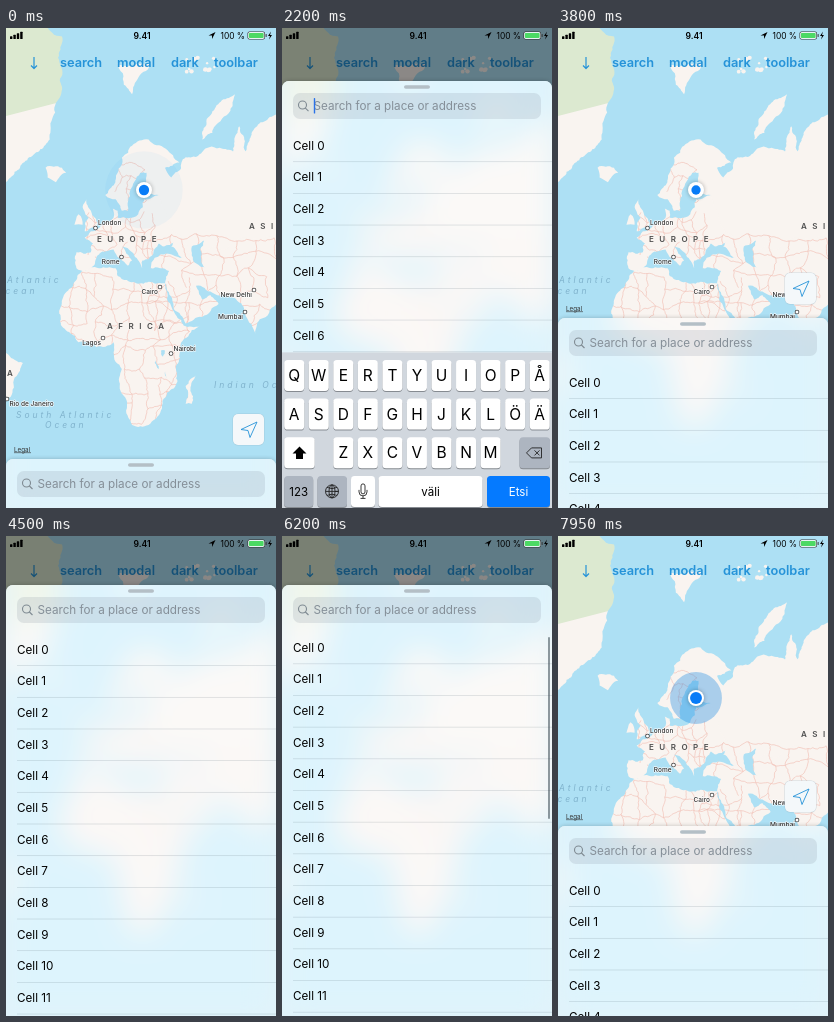
Animation of 270x480 px, one loop 8000 ms. Source, as an HTML page with a canvas:

```html
<!DOCTYPE html>
<html lang="en">
<head>
<meta charset="utf-8">
<title>Map with search sheet</title>
<style>
  html, body { margin: 0; width: 100%; height: 100%; overflow: hidden; background: #ade0f4; }
  canvas { display: block; width: 270px; height: 480px; }
</style>
</head>
<body>
<canvas id="stage"></canvas>
<script>
const W = 270, H = 480, LOOP = 8000;
const DPR = window.devicePixelRatio || 1;
const WATER = '#ade0f4', LAND = '#f9f4f0', BLUE = '#087cf7', TINT = '#2693d8';
const SANS = 'Inter, Roboto, sans-serif';

// Key "longitude,latitude" points; the coast between them is roughened
const GREENLAND = '-50,84 -16,82 -19,76 -22,71 -32,68 -41,64 -50,60';
const COASTS = [
  GREENLAND,
  '-24,66 -16,66 -14,65 -19,63 -23,64',
  '11,80 27,80 18,77 14,78',
  '52,71 57,75 68,77 57,72',
  '-5,50 1,51 -2,56 -4,59 -6,57 -3,54',
  '-6,52 -10,52 -8,55',
  '-9,37 -9,43 -2,43 -1,46 -5,48 2,51 9,54 8,57 11,56 11,54 21,55 24,59 31,60 50,60 52,38 42,41 37,45 39,47 33,45 31,46 28,42 23,40 23,37 19,42 13,45 18,40 16,38 9,44 3,43 0,39 -5,36',
  '31,60 22,60 25,65 22,65 17,61 16,56 13,56 10,59 5,60 11,65 18,70 26,71 41,67 34,66 37,64 44,68 67,69 70,73 73,68 76,72 95,77 95,30 60,36 50,38 35,54',
  '95,46 95,22 88,22 80,15 78,8 73,17 72,21 67,25 57,27 49,30 52,24 56,26 60,22 52,16 44,13 35,28 34,31 36,36 27,37 29,41 42,41 52,44',
  '-6,36 10,37 11,34 20,31 34,31 34,28 33,30 37,21 43,12 51,12 41,-2 40,-15 35,-20 32,-28 26,-34 18,-34 12,-17 13,-9 9,-1 9,4 -8,4 -17,14 -13,28',
  '49,-12 47,-25 44,-25 44,-17',
  '-50,0 -35,-6 -39,-13 -41,-22 -50,-26',
];
const LAKES = ['47,45 53,47 51,44 54,37 49,39', '32,0 34,0 33,-3', '29,-4 31,-9 29,-6', '34,-10 35,-14 34,-12'];
// left, top, columns, rows, spacing of the border mesh
const BORDER_MESHES = [[80, 182, 8, 6, 9.5], [112, 138, 3, 4, 12], [145, 212, 8, 6, 17], [50, 250, 10, 11, 14.5]];
// name, dot x, dot y, label on the right, label below
const CITIES = [
  ['London', 89.5, 200, true, false], ['Rome', 115.5, 229, false, true], ['Cairo', 154, 259, false, true],
  ['Lagos', 97, 310, false, true], ['Nairobi', 165, 325.5, true, false], ['New Delhi', 248, 262, false, true],
  ['Mumbai', 239, 284, false, true], ['Rio de Janeiro', 1, 371, true, true],
];

let seed = 7;
const random = () => (seed = seed * 16807 % 2147483647) / 2147483647;

function makeLayer(canvas) {
  canvas.width = W * DPR;
  canvas.height = H * DPR;
  const c = canvas.getContext('2d');
  c.scale(DPR, DPR);
  return c;
}
const newLayer = () => makeLayer(document.createElement('canvas'));

function text(c, str, x, y, size, color, { weight = 400, align = 'left', style = 'normal', spacing = 0, halo } = {}) {
  c.font = `${style} ${weight} ${size}px ${SANS}`;
  c.textAlign = align;
  c.letterSpacing = spacing + 'px';
  if (halo) {
    c.strokeStyle = halo;
    c.lineWidth = 1.4;
    c.lineJoin = 'round';
    c.strokeText(str, x, y);
  }
  c.fillStyle = color;
  c.fillText(str, x, y);
}
function box(c, x, y, w, h, r, color) {
  c.fillStyle = color;
  c.beginPath();
  c.roundRect(x, y, w, h, r);
  c.fill();
}
function disc(c, x, y, r, color) {
  c.fillStyle = color;
  c.beginPath();
  c.arc(x, y, r, 0, 7);
  c.fill();
}
const shape = (d, x, y) => { const p = new Path2D(); p.addPath(new Path2D(d), { e: x, f: y }); return p; };

// Mercator projection onto the stage
function project(point) {
  const [lon, lat] = point.split(',').map(Number);
  return [89 + 2.06 * lon, 322.5 - 118 * Math.log(Math.tan(Math.PI / 4 + lat * Math.PI / 360))];
}

// Midpoint displacement from a to b
function roughen(path, a, b) {
  const dx = b[0] - a[0], dy = b[1] - a[1];
  if (Math.hypot(dx, dy) < 3) return path.lineTo(...b);
  const k = (random() - .5) * .3;
  const mid = [(a[0] + b[0]) / 2 - dy * k, (a[1] + b[1]) / 2 + dx * k];
  roughen(path, a, mid);
  roughen(path, mid, b);
}

function coastPath(points) {
  const path = new Path2D(), corners = points.split(' ').map(project);
  path.moveTo(...corners[0]);
  corners.forEach((p, i) => roughen(path, p, corners[(i + 1) % corners.length]));
  return path;
}

function bordersPath([left, top, cols, rows, step]) {
  const path = new Path2D();
  const jitter = () => (random() - .5) * step * .8;
  const nodes = Array.from({ length: rows }, (_, r) =>
    Array.from({ length: cols }, (_, c) => [left + c * step + jitter(), top + r * step + jitter()]));
  nodes.forEach((row, r) => row.forEach((node, c) => {
    for (const next of [row[c + 1], nodes[r + 1]?.[c]]) {
      if (!next || random() < .15) continue;
      path.moveTo(...node);
      roughen(path, node, next);
    }
  }));
  return path;
}

function drawLand(c) {
  c.fillStyle = LAND;
  COASTS.forEach(points => c.fill(coastPath(points)));
  for (let i = 0; i < 14; i++) disc(c, 178 + random() * 34, 28 + random() * 16, .6 + random() * 1.8, LAND);
  c.globalCompositeOperation = 'source-atop';
  c.fillStyle = '#dce9d0';
  c.fill(new Path2D('M0 0H62V72L0 88Z'));
  c.strokeStyle = '#f2bfb5';
  c.lineWidth = .65;
  BORDER_MESHES.forEach(mesh => c.stroke(bordersPath(mesh)));
  c.fillStyle = WATER;
  LAKES.forEach(points => c.fill(coastPath(points)));
}

function drawLabels(c) {
  const sea = (str, x, y) => text(c, str, x, y, 8.5, '#80b3cd', { style: 'italic', spacing: 3 });
  const land = (str, x, y) => text(c, str, x, y, 8, '#505050', { weight: 600, spacing: 5.5, halo: LAND });
  sea('Atlantic', 1, 255);
  sea('Ocean', -10, 265.5);
  sea('South Atlantic', 10, 390);
  sea('Ocean', 39, 400);
  sea('Indian Ocean', 208, 360);
  land('EUROPE', 91, 214);
  land('AFRICA', 101, 301);
  land('ASIA', 243, 201);
  land('A', 1, 348);
  for (const [name, x, y, right, below] of CITIES) {
    text(c, name, x + (right ? 2.5 : -2), y + (below ? 6.8 : -2.8), 6.5, '#333',
      { weight: 500, halo: '#fffc', align: right ? 'left' : 'right' });
    disc(c, x, y, 2.3, '#444');
    disc(c, x, y, 1.5, '#fff');
  }
}

const landLayer = newLayer();
drawLand(landLayer);
const mapLayer = newLayer();
mapLayer.fillStyle = WATER;
mapLayer.fillRect(0, 0, W, H);
mapLayer.drawImage(landLayer.canvas, 0, 0, W, H);

const frosted = newLayer();
frosted.fillStyle = WATER;
frosted.fillRect(0, 0, W, H);
frosted.filter = `blur(${15 * DPR}px) saturate(1.4)`;
frosted.drawImage(mapLayer.canvas, 0, 0, W, H);
frosted.filter = 'none';
frosted.fillStyle = 'rgba(253,252,253,.68)';
frosted.fillRect(0, 0, W, H);
drawLabels(mapLayer);

const ctx = makeLayer(document.getElementById('stage'));

// Eased value between [time, value] keys
function track(t, keys) {
  if (t <= keys[0][0]) return keys[0][1];
  for (let i = 1; i < keys.length; i++) {
    const [t0, v0] = keys[i - 1], [t1, v1] = keys[i];
    if (t < t1) return v0 + (v1 - v0) * (1 - (1 - (t - t0) / (t1 - t0)) ** 3);
  }
  return keys[keys.length - 1][1];
}

const TIP = 431, HALF = 290, FULL = 49, ROW = 31.67, KEYBOARD = 322, LIST_END = 409;
const SHEET = [[1850, TIP], [2300, FULL], [3350, FULL], [3800, HALF], [3950, HALF], [4450, FULL], [6350, FULL], [7075, HALF]];
const SCROLL = [[3200, 0], [3300, -3], [3600, 0], [4850, 0], [5500, 416], [5700, LIST_END], [6300, 0]];
const SCROLLBAR = [[3200, 0], [3280, 1], [3500, 1], [3750, 0], [4850, 0], [4900, 1], [6300, 1], [6550, 0]];
const KEYS = [[1900, H], [2300, KEYBOARD], [3300, KEYBOARD], [3600, H]];

function drawLocation(t) {
  const s = (t + 1600) % 3000 / 1000;
  const fade = Math.max(0, 1 - s / 2.2) ** 2;
  disc(ctx, 138, 162, 41 * (1 - Math.exp(-s / .55)), `rgba(15,130,225,${.6 * fade})`);
  ctx.save();
  ctx.shadowColor = 'rgba(0,0,0,.3)';
  ctx.shadowBlur = 4 * DPR;
  disc(ctx, 138, 162, 8, '#fff');
  ctx.restore();
  disc(ctx, 138, 162, 5.3 + .7 * Math.sin(s * Math.PI * 2 / 3), BLUE);
}

function drawMapControls(top) {
  const y = Math.max(top, HALF);
  text(ctx, 'Legal', 8, y - 7.5, 6.3, '#333');
  ctx.fillRect(8, y - 6.5, 17, .6);
  box(ctx, 226.5, y - 45.5, 32, 32, 5.5, 'rgba(150,180,195,.45)');
  box(ctx, 227, y - 45, 31, 31, 5, '#f4f8fa');
  ctx.strokeStyle = TINT;
  ctx.lineWidth = .9;
  ctx.lineJoin = 'round';
  ctx.stroke(shape('M8 -7.5L-8 0L-1 1L1 8Z', 243, y - 29.5));
}

function drawTopButtons() {
  ctx.strokeStyle = TINT;
  ctx.lineWidth = 1.2;
  ctx.stroke(shape('M0 -6V5.5M-3 2.5L0 5.5L3 2.5', 28, 35));
  [['search', 54], ['modal', 111], ['dark', 165], ['toolbar', 208]]
    .forEach(([str, x]) => text(ctx, str, x, 39.3, 12.8, TINT, { weight: 600 }));
}

function drawStatusBar() {
  for (let i = 0; i < 4; i++) box(ctx, 4 + i * 3.4, 8.2 - i * 1.5, 2.4, 2.8 + i * 1.5, .5, '#000');
  text(ctx, '9.41', 136, 10.6, 8.6, '#000', { weight: 600, align: 'center' });
  ctx.fill(shape('M3.5 -3.5L-3.5 0H0V3.5Z', 206, 7.5));
  text(ctx, '100 %', 214.5, 10.6, 8.4, '#000');
  box(ctx, 241.5, 3.5, 17.5, 8, 2, '#333');
  box(ctx, 242.1, 4.1, 16.3, 6.8, 1.6, '#e8f3f4');
  box(ctx, 242.9, 4.9, 14.7, 5.2, 1, '#4cd964');
  box(ctx, 259.6, 6, 1, 3, .5, '#333');
  ctx.fillStyle = '#000';
  ctx.fill(shape('M1 -4L-2 .5H0L-1 4L2 -.5H0Z', 264, 7.5));
}

function drawList(t, top) {
  const off = track(t, SCROLL);
  ctx.save();
  ctx.beginPath();
  ctx.rect(0, top + 46, W, H);
  ctx.clip();
  for (let i = 0; i < 25; i++) {
    const y = top + 64.5 + i * ROW - off;
    text(ctx, 'Cell ' + i, 11, y + 4.1, 11.7, '#000');
    ctx.fillStyle = 'rgba(60,80,95,.2)';
    ctx.fillRect(11, y + 15.8, W, .7);
  }
  const inside = Math.min(LIST_END, Math.max(0, off));
  const over = Math.abs(off - inside);
  const y = 100 + inside / LIST_END * 195.5 + Math.max(0, off - inside);
  box(ctx, 266, y, 2, 182 - over, 1, `rgba(40,55,65,${.5 * track(t, SCROLLBAR)})`);
  ctx.restore();
}

function drawSheet(t, top) {
  ctx.save();
  ctx.shadowColor = 'rgba(0,0,0,.22)';
  ctx.shadowBlur = 4 * DPR;
  box(ctx, 0, top, W, H, 7, '#e5f4fb');
  ctx.restore();
  ctx.save();
  ctx.beginPath();
  ctx.roundRect(0, top, W, H, 7);
  ctx.clip();
  ctx.drawImage(frosted.canvas, 0, 0, W, H);
  ctx.restore();
  drawList(t, top);
  box(ctx, 122, top + 4.2, 26, 3.6, 1.8, '#b4bfc6');
  box(ctx, 11, top + 12, 248, 26, 7, 'rgba(120,135,150,.18)');
  ctx.strokeStyle = '#7f8a92';
  ctx.lineWidth = 1.1;
  ctx.stroke(shape('M3.5 -1A4 4 0 1 1 -4.5 -1A4 4 0 1 1 3.5 -1M2.4 2L5.5 5', 21, top + 25));
  text(ctx, 'Search for a place or address', 31.5, top + 29, 11.7, '#858f98');
  const editing = t > 2150 && t < 3380, blinkedOff = t >= 2800 && t < 3000;
  if (editing && !blinkedOff) box(ctx, 31.8, top + 17, 1.4, 15.5, .6, '#2a72e8');
}

function drawKeyboard(y) {
  if (y >= H) return;
  const GREY = '#adb5c0', PITCH = 24.55, ROW_PITCH = 38.7;
  ctx.save();
  ctx.translate(0, y);
  ctx.fillStyle = '#d1d7de';
  ctx.fillRect(0, 0, W, H);
  const key = (x, row, w, color, label = '', size = 15.5, ink = '#000') => {
    const ky = 7.5 + row * ROW_PITCH;
    box(ctx, x, ky + 1, w, 31, 3.6, '#868b91');
    box(ctx, x, ky, w, 31, 3.6, color);
    text(ctx, label, x + w / 2, ky + 15.5 + size * .36, size, ink, { align: 'center' });
  };
  ['QWERTYUIOPÅ', 'ASDFGHJKLÖÄ', '  ZXCVBNM'].forEach((row, r) =>
    [...row].forEach((ch, i) => ch !== ' ' && key(2.2 + i * PITCH, r, 20, '#fff', ch)));
  key(2.2, 2, 30.5, '#fff');
  key(237.5, 2, 30.5, GREY);
  key(2.2, 3, 29, GREY, '123', 11.5);
  key(35.5, 3, 29.5, GREY);
  key(69, 3, 24, '#fff');
  key(96.5, 3, 104, '#fff', 'väli', 11.5);
  key(205, 3, 63, '#057aff', 'Etsi', 11.5, '#fff');
  ctx.fillStyle = '#000';
  ctx.strokeStyle = '#222';
  ctx.lineWidth = .9;
  ctx.fill(shape('M0 -6.5L7 .5H3.5V6H-3.5V.5H-7Z', 17.5, 100.5));
  ctx.stroke(shape('M-8 0L-3 -5H7V5H-3ZM0 -2.5L5 2.5M5 -2.5L0 2.5', 252.5, 100.5));
  ctx.stroke(shape('M-6.5 0H6.5M0 -6.5V6.5M-5 -4Q0 -1.5 5 -4M-5 4Q0 1.5 5 4', 50, 139));
  ctx.beginPath();
  ctx.ellipse(50, 139, 6.5, 6.5, 0, 0, 7);
  ctx.ellipse(50, 139, 3, 6.5, 0, 0, 7);
  ctx.stroke();
  ctx.stroke(shape('M-4 -1V1A4 4 0 0 0 4 1V-1M0 5V7.5M-2.5 7.5H2.5M-2 -5A2 2 0 0 1 2 -5V1A2 2 0 0 1 -2 1Z', 81, 138.5));
  ctx.restore();
}

function render(t) {
  const top = track(t, SHEET);
  ctx.drawImage(mapLayer.canvas, 0, 0, W, H);
  drawLocation(t);
  drawMapControls(top);
  drawTopButtons();
  ctx.fillStyle = `rgba(0,0,0,${.45 * Math.max(0, (HALF - top) / (HALF - FULL))})`;
  ctx.fillRect(0, 0, W, H);
  drawStatusBar();
  drawSheet(t, top);
  drawKeyboard(track(t, KEYS));
}

const start = performance.now();
function loop() {
  render((performance.now() - start) % LOOP);
  requestAnimationFrame(loop);
}
loop();
</script>
</body>
</html>
```
